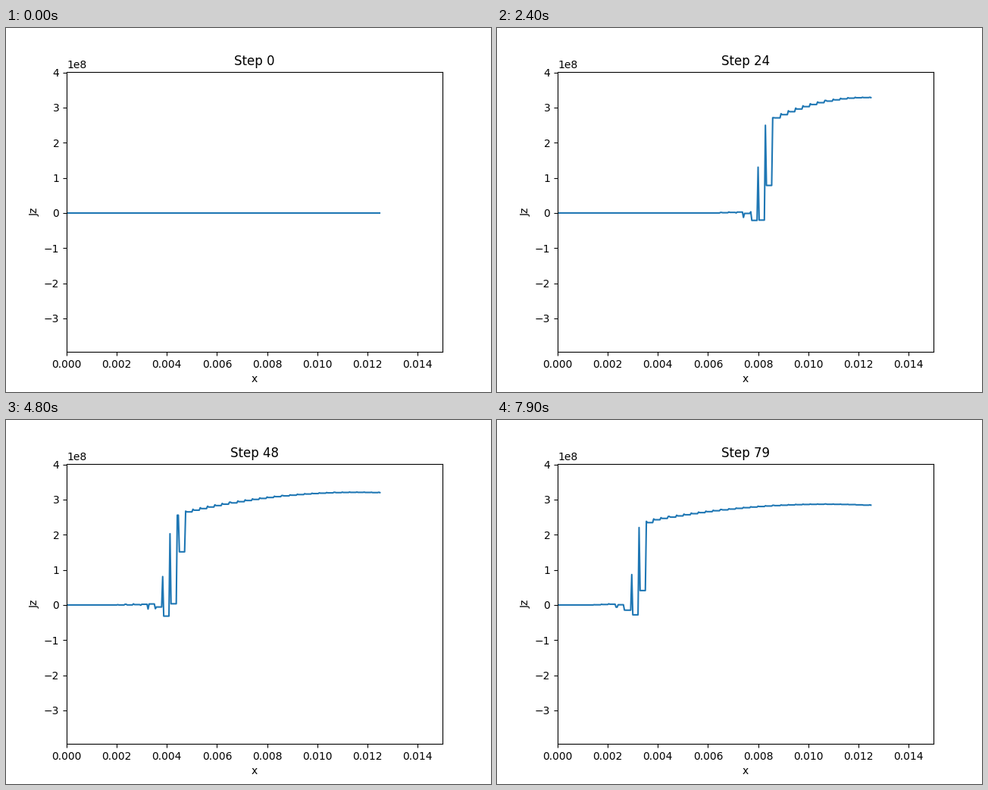
A matplotlib script for the animation above (8000 ms loop, 640 by 480 pixels).

```python
import numpy as np
import matplotlib.pyplot as plt
from matplotlib.animation import FuncAnimation

STEPS = 80
CELLS = 42
LENGTH = 0.0125
SAMPLES = 301

# Key points of the motion: front position in cells, level in 1e6,
# and how far the slivers ahead of the front are smeared
times = np.array([0, 16, 32, 41, 55, 70, 79])
fronts = np.array([42.3, 33.63, 22.865, 17.84, 12.776, 11.634, 11.40])
levels = [318, 325, 331.5, 333.5, 320, 303, 298]
smears = [0.7, 0.7, 1.4, 1.37, 1.09, 1, 1]
speeds = np.gradient(fronts, times)

# Relative height against distance from the front
MAIN = ([-7, -3.6, -2.7, -1.8, -1.4, -0.85, -0.62, -0.4, 0.135, 0.62],
        [0, 0.012, -0.03, -0.13, -0.12, 0.015, 0.035, 0.175, 0.575, 1])
SLIVER = ([-7, -4.4, -3.5, -2.5, -2.1, -1.4, -0.63, -0.4, 0, 1, 12],
          [0, 0.014, -0.02, -0.09, 0.02, 0.37, 0.83, 0.94, 0.98, 1.01, 1.003])

x = np.linspace(0, LENGTH, SAMPLES)
pos = np.arange(SAMPLES) * CELLS / (SAMPLES - 1) + 1e-9
cell = np.minimum(np.floor(pos), CELLS - 1)
sliver = (pos - cell > 0.835) & (pos < CELLS)  # narrow part before the next cell
index = cell + sliver


def front_at(t):
    """Cubic Hermite path of the front."""
    i = min(np.searchsorted(times, t, side="right") - 1, len(times) - 2)
    h = times[i + 1] - times[i]
    r = (t - times[i]) / h
    return ((1 + 2 * r) * (1 - r) ** 2 * fronts[i]
            + r * (1 - r) ** 2 * h * speeds[i]
            + r * r * (3 - 2 * r) * fronts[i + 1]
            + r * r * (r - 1) * h * speeds[i + 1])


def plateau(u, front, t):
    """Parabola from the front to the edge, drooping at the edge later on."""
    s = np.clip((u + 0.5) / max(CELLS - 0.5 - front, 1), 0, 1)
    droop = np.interp(t, [41, 55], [0, 14])
    rise = 0.785 + 0.215 * (1 - (1 - s) ** 2)
    return np.interp(t, times, levels) * rise - droop * s ** 2


def current(t):
    if t == 0:
        return np.zeros(SAMPLES)
    front = front_at(t)
    u = index - front
    smear = np.interp(t, times, smears)
    ratio = np.where(sliver, np.interp(u / smear, *SLIVER), np.interp(u, *MAIN))
    return 1e6 * ratio * plateau(u, front, t)


plt.rcParams["font.family"] = "DejaVu Sans"
fig, ax = plt.subplots(figsize=(6.4, 4.8), dpi=100)
line, = ax.plot(x, np.zeros(SAMPLES), color="#1f77b4", lw=1.5)
ax.set_xlim(0, 0.015)
ax.set_ylim(-3.955e8, 4.02e8)
ax.set_xlabel("x")
ax.set_ylabel("Jz")
title = ax.set_title("Step 0")


def update(step):
    line.set_ydata(current(step))
    title.set_text(f"Step {step}")
    return line, title


anim = FuncAnimation(fig, update, frames=STEPS, interval=100,
                     repeat=True, repeat_delay=0, blit=False)
plt.show()
```
